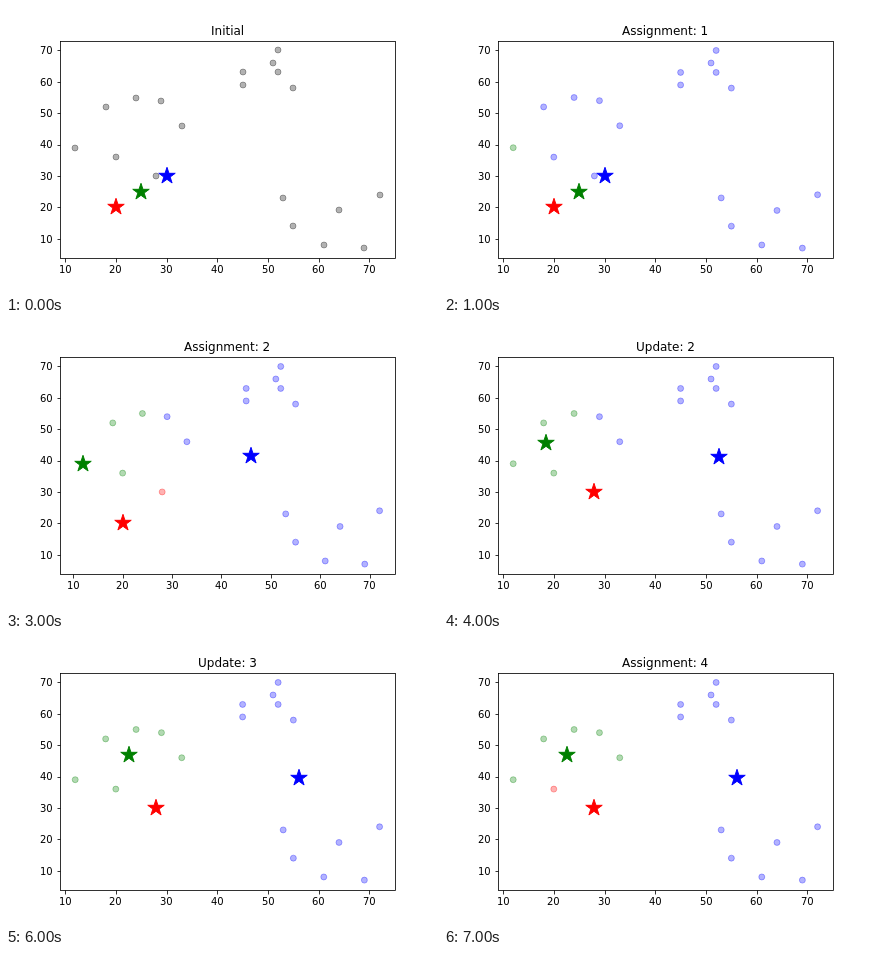
An HTML page with a canvas for the animation above (8000 ms loop, 432x288 px).

```html
<!DOCTYPE html>
<html lang="en">
<head>
<meta charset="utf-8">
<title>K-means clustering</title>
<style>
  html, body { margin: 0; width: 100%; height: 100%; overflow: hidden; background: #fff; }
  canvas { display: block; }
</style>
</head>
<body>
<canvas id="stage" width="432" height="288"></canvas>
<script>
const ctx = document.getElementById('stage').getContext('2d');
const STEP_MS = 1000;
const AXES = { left: 54, right: 388.8, top: 34.56, bottom: 252 };
const COLORS = ['#ff0000', '#008000', '#0000ff'];
const MARGIN = 0.05;
const STAR_RADIUS = Math.sqrt(300) / 2;
const STAR_REACH = 1.6; // how far a star widens the x range, in data units

const points = [
  [12, 39], [20, 36], [28, 30], [18, 52], [29, 54], [33, 46], [24, 55],
  [45, 59], [45, 63], [52, 70], [51, 66], [52, 63], [55, 58],
  [53, 23], [55, 14], [61, 8], [64, 19], [69, 7], [72, 24]
];

const mean = values => values.reduce((a, b) => a + b, 0) / values.length;

function nearest([x, y], centers) {
  const distances = centers.map(([cx, cy]) => Math.hypot(x - cx, y - cy));
  return distances.indexOf(Math.min(...distances));
}

function moveCenters(centers, labels) {
  return centers.map((center, k) => {
    const members = points.filter((_, i) => labels[i] === k);
    return members.length
      ? [mean(members.map(p => p[0])), mean(members.map(p => p[1]))]
      : center;
  });
}

function buildSteps() {
  let centers = [[20, 20], [25, 25], [30, 30]];
  const steps = [{ title: 'Initial', centers, labels: null }];
  for (let round = 1; round <= 4; round++) {
    const labels = points.map(p => nearest(p, centers));
    steps.push({ title: 'Assignment: ' + round, centers, labels });
    if (round === 4) break;
    centers = moveCenters(centers, labels);
    steps.push({ title: 'Update: ' + round, centers, labels });
  }
  return steps;
}

// Linear scale from data [lo, hi], padded by the margin, to pixels [from, to].
function makeScale(lo, hi, from, to) {
  const pad = (hi - lo) * MARGIN;
  return v => from + (v - lo + pad) / (hi - lo + 2 * pad) * (to - from);
}

function drawDot(x, y, color) {
  ctx.globalAlpha = 0.3;
  ctx.fillStyle = ctx.strokeStyle = color;
  ctx.lineWidth = 1;
  ctx.beginPath();
  ctx.arc(x, y, 3, 0, 2 * Math.PI);
  ctx.fill();
  ctx.stroke();
  ctx.globalAlpha = 1;
}

function drawStar(x, y, color) {
  ctx.fillStyle = ctx.strokeStyle = color;
  ctx.lineWidth = 1;
  ctx.lineJoin = 'round';
  ctx.beginPath();
  for (let i = 0; i < 10; i++) {
    const r = i % 2 ? STAR_RADIUS * 0.381966 : STAR_RADIUS;
    const angle = i * Math.PI / 5;
    ctx.lineTo(x + r * Math.sin(angle), y - r * Math.cos(angle));
  }
  ctx.closePath();
  ctx.fill();
  ctx.stroke();
}

function drawLine(x1, y1, x2, y2) {
  ctx.beginPath();
  ctx.moveTo(x1, y1);
  ctx.lineTo(x2, y2);
  ctx.stroke();
}

// align: 0 = start at x, 0.5 = centre on x, 1 = end at x
function drawText(text, x, baseline, size, align) {
  ctx.font = size + 'px "DejaVu Sans", sans-serif';
  ctx.fillText(text, Math.round(x - ctx.measureText(text).width * align), Math.round(baseline));
}

function drawAxes(sx, sy, title) {
  const left = AXES.left + 0.5, bottom = AXES.bottom + 0.5;
  const right = Math.round(AXES.right) + 0.5, top = Math.round(AXES.top) + 0.5;
  ctx.strokeStyle = ctx.fillStyle = '#000';
  ctx.lineWidth = 0.8;
  ctx.lineJoin = 'miter';
  ctx.strokeRect(left, top, right - left, bottom - top);
  for (let v = 10; v <= 70; v += 10) {
    const x = Math.round(sx(v)) + 0.5, y = Math.round(sy(v)) + 0.5;
    drawLine(x, bottom, x, bottom + 4);
    drawLine(left, y, left - 3, y);
    drawText(String(v), sx(v), 267, 10, 0.5);
    drawText(String(v), AXES.left - 7, sy(v) + 3.8, 10, 1);
  }
  drawText(title, (AXES.left + AXES.right) / 2, 29, 12, 0.5);
}

function drawStep({ title, centers, labels }) {
  const minX = Math.min(12, ...centers.map(c => c[0] - STAR_REACH));
  const sx = makeScale(minX, 72, AXES.left, AXES.right);
  const sy = makeScale(7, 70, AXES.bottom, AXES.top);

  ctx.fillStyle = '#fff';
  ctx.fillRect(0, 0, 432, 288);
  points.forEach(([x, y], i) => {
    if (labels) drawDot(sx(x), sy(y), COLORS[labels[i]]);
    else drawDot(Math.round(sx(x)), Math.round(sy(y)), '#000');
  });
  centers.forEach(([x, y], k) => drawStar(Math.round(sx(x)), Math.round(sy(y)), COLORS[k]));
  drawAxes(sx, sy, title);
}

const steps = buildSteps();
const start = performance.now();

function tick() {
  const elapsed = performance.now() - start;
  drawStep(steps[Math.floor(elapsed / STEP_MS) % steps.length]);
  requestAnimationFrame(tick);
}
tick();
</script>
</body>
</html>
```
